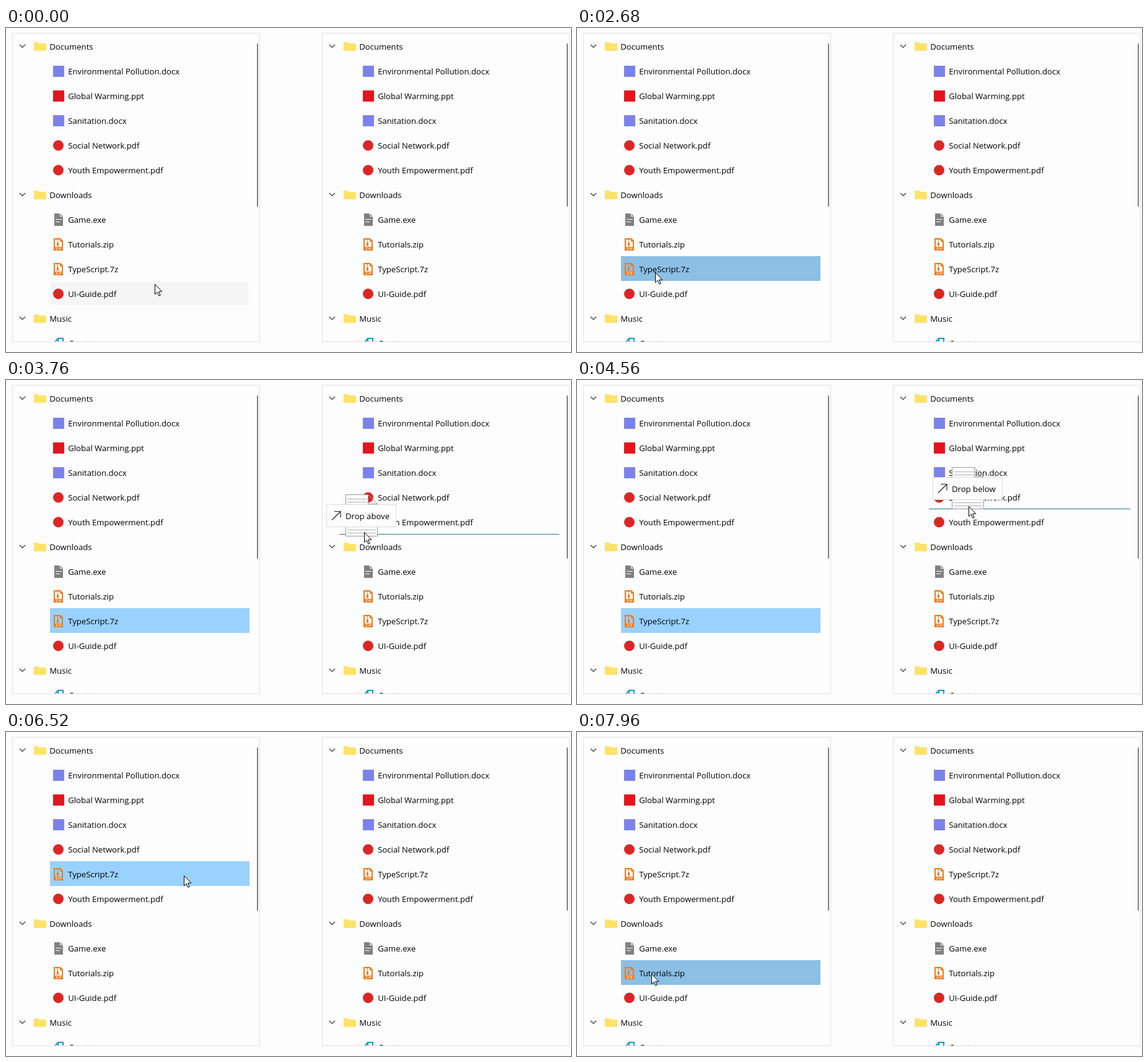
An HTML page for the animation above (8000 ms loop, 912 by 524 pixels).

```html
<!DOCTYPE html>
<html lang="en">
<head>
<meta charset="utf-8">
<title>Drag between trees</title>
<style>
html, body { margin: 0; width: 100%; height: 100%; overflow: hidden; background: #fdfdfd; }
svg { display: block; width: 912px; height: 524px; }
text { font: 13.15px "Open Sans", "Noto Sans", sans-serif; fill: #000; white-space: pre; }
</style>
</head>
<body>
<svg id="stage" viewBox="0 0 912 524">
  <defs>
    <clipPath id="view"><rect x="10" y="8" width="400" height="499"/></clipPath>
    <g id="folder">
      <path d="M22 17l4.5 4.5 4.5-4.5" fill="none" stroke="#333" stroke-width="1.2"/>
      <path d="M45 13h7l2 2h11v12h-20z" fill="#ffe26a"/>
    </g>
    <rect id="docx" x="76" y="11" width="18" height="18" fill="#7b83eb"/>
    <rect id="ppt" x="76" y="11" width="18" height="18" fill="#e3141e"/>
    <circle id="pdf" cx="84.5" cy="20" r="8.5" fill="#dc2626"/>
    <g id="exe">
      <path d="M78 10h9.5l4.5 4.5V30H78z" fill="#808080"/>
      <path d="M87.5 10v4.5h4.5M80 19.5h10M80 23.5h7" fill="none" stroke="#fdfdfd"/>
    </g>
    <g id="zip" fill="#ee7a1c" stroke="#ee7a1c">
      <path d="M78 11h9.5l3.5 3.5V29H78z" fill="none" stroke-width="2"/>
      <path d="M87 10.500l5 5h-5zM77.500 24h14v5.500h-14z" stroke="none"/>
      <path d="M83.500 12v6" stroke-width="2" stroke-dasharray="1.3 1"/>
      <path d="M82 17.500h3v5h-3z" stroke="none"/>
      <path d="M80.500 25.500h2.500l-2.500 3h2.500M85 25.500v3M87 28.500v-3h2v1.500h-2" fill="none" stroke="#fff" stroke-width=".7"/>
    </g>
    <path id="audio" d="M78 31v-12l6-7h8v19M78 19h6v-7" fill="none" stroke="#1b96d0" stroke-width="2"/>
  </defs>
</svg>
<script>
const LOOP = 8000, STEP = 40, ROW = 40, TOP = 10, GAP = 500;
const PRESS = 2640, DRAG = 2960, DROP = 4920, REPRESS = 7920;
const BLUE = '#99d1ff', PRESSED = '#8bbfe4', HOVER = '#f5f5f5';
const stage = document.getElementById('stage');

const items = [
  ['folder', 'Documents'], ['docx', 'Environmental Pollution.docx'],
  ['ppt', 'Global Warming.ppt'], ['docx', 'Sanitation.docx'],
  ['pdf', 'Social Network.pdf'], ['pdf', 'Youth Empowerment.pdf'],
  ['folder', 'Downloads'], ['exe', 'Game.exe'], ['zip', 'Tutorials.zip'],
  ['zip', 'TypeScript.7z'], ['pdf', 'UI-Guide.pdf'],
  ['folder', 'Music'], ['audio', 'Gouttes']
].map(([icon, label]) => ({ icon, label, isFolder: icon === 'folder' }));
const find = label => items.findIndex(item => item.label === label);
const moved = find('TypeScript.7z'), second = find('Tutorials.zip');
const before = [...items.keys()];
const after = before.filter(id => id !== moved);
after.splice(find('Youth Empowerment.pdf'), 0, moved);

// The pointer rests between moves; sag bows the line downwards.
const moves = [
  { from: 440, to: 1240, x: 158, y: 384 },
  { from: 1280, to: 1440, x: 145, y: 389, sag: 5 },
  { from: 2000, to: 2600, x: 126, y: 395, sag: 8 },
  { from: 2920, to: 3760, x: 578, y: 246, sag: 60 },
  { from: 3760, to: 4560, x: 632, y: 204, sag: 12 },
  { from: 5200, to: 6040, x: 560, y: 367 },
  { from: 6040, to: 6520, x: 287, y: 232 },
  { from: 6520, to: 6840, x: 262, y: 243 },
  { from: 6880, to: 7680, x: 120, y: 391 }
];

function pointAt(t) {
  let x = 240, y = 414;
  for (const m of moves) {
    const k = Math.min(1, Math.max(0, (t - m.from) / (m.to - m.from)));
    x += (m.x - x) * k;
    y += (m.y - y) * k + (m.sag || 0) * Math.sin(Math.PI * k);
    if (k < 1) break;
  }
  return [Math.round(x), Math.round(y)];
}

function set(node, attrs) {
  for (const k in attrs) node.setAttribute(k, attrs[k]);
}
function el(tag, attrs, parent = stage, content = '') {
  const node = document.createElementNS('http://www.w3.org/2000/svg', tag);
  set(node, attrs);
  node.textContent = content;
  return parent.appendChild(node);
}
function show(node, on) {
  node.style.display = on ? '' : 'none';
}
function place(node, x, y) {
  set(node, { transform: `translate(${x} ${y})` });
}

function makePanel(dx) {
  const panel = el('g', { transform: `translate(${dx} 0)` });
  el('rect', { x: 10.5, y: 8.5, width: 399, height: 499, fill: 'none', stroke: '#e0e0e0' }, panel);
  const view = el('g', { 'clip-path': 'url(#view)' }, panel);
  const hover = el('rect', { height: 37, fill: HOVER }, view);
  const chosen = el('rect', { x: 71, width: 322, height: 40 }, view);
  const rows = items.map(({ icon, label, isFolder }) => {
    const row = el('g', {}, view);
    el('use', { href: '#' + icon }, row);
    el('text', { x: isFolder ? 70.2 : 100.2, y: 25 }, row, label);
    return row;
  });
  el('rect', { x: 405, y: 25, width: 2, height: 264, rx: 1, fill: '#7f7f7f' }, panel);
  return { dx, hover, chosen, rows };
}

const panels = [makePanel(0), makePanel(GAP)];
const line = el('rect', { height: 1, fill: '#34718f' });

const ghost = el('g', {});
el('path', { d: 'M.5.5h36l15 15v52H.5zM36.5.5v15h15', fill: '#fdfdfd', stroke: '#999' }, ghost);
for (let y = 7; y < 66; y += 5)
  el('path', { d: `M3 ${y + .5}H${y < 16 ? 35 : 49}`, stroke: '#b0b0b0' }, ghost);
const tip = el('g', { transform: 'translate(-31 16)' }, ghost);
el('rect', { x: .5, y: .5, width: 112, height: 36, fill: '#fdfdfd', stroke: '#dcdcdc' }, tip);
el('path', { d: 'M9 25.5l14-14M13 11.5h10v10', fill: 'none', stroke: '#222', 'stroke-width': 1.2 }, tip);
const tipText = el('text', { x: 31, y: 24 }, tip);

const pointer = el('path', {
  d: 'M.5.5v16.2l3.7-3.5 2.6 6 2.4-1-2.6-5.9h5.2z', fill: '#fff', stroke: '#000'
});

function drawDrag(t, y, order, over) {
  const dragging = t >= DRAG && t < DROP;
  show(ghost, dragging);
  show(line, dragging && over);
  show(tip, over);
  if (!dragging) return;
  const [gx, gy] = pointAt(t - 8);
  place(ghost, gx - 26, gy - 64);
  if (!over) return;
  const hit = y + 4 - TOP, index = Math.floor(hit / ROW);
  const below = hit - index * ROW >= ROW / 2;
  const left = items[order[index]].isFolder ? 38 : 68;
  tipText.textContent = below ? 'Drop below' : 'Drop above';
  set(line, {
    x: over.dx + left, width: 393 - left,
    y: TOP + index * ROW + (below ? ROW - 2 : -1)
  });
}

function draw(t) {
  const [x, y] = pointAt(t);
  const order = t < DROP + STEP ? before : after;
  const over = panels.find(p => x > p.dx + 10 && x < p.dx + 405);
  const idle = t < DRAG || t >= DROP;
  const picked = t < PRESS ? -1 : t < REPRESS ? moved : second;
  const index = Math.floor((y - TOP) / ROW);

  for (const p of panels) {
    order.forEach((id, i) => place(p.rows[id], 0, TOP + i * ROW));
    const own = p === panels[0] ? picked : -1;
    show(p.chosen, own >= 0);
    set(p.chosen, {
      y: TOP - 1 + order.indexOf(own) * ROW,
      fill: t < DRAG || t >= REPRESS ? PRESSED : BLUE
    });
    show(p.hover, idle && p === over && order[index] !== own);
    const left = items[order[index]].isFolder ? 42 : 72;
    set(p.hover, { x: left, width: 391 - left, y: TOP + index * ROW + 1 });
  }
  drawDrag(t, y, order, over);
  place(pointer, x, y);
}

const start = performance.now();
function tick(now) {
  const t = Math.max(0, now - start) % LOOP;
  draw(Math.floor(t / STEP) * STEP);
  requestAnimationFrame(tick);
}
draw(0);
requestAnimationFrame(tick);
</script>
</body>
</html>
```
